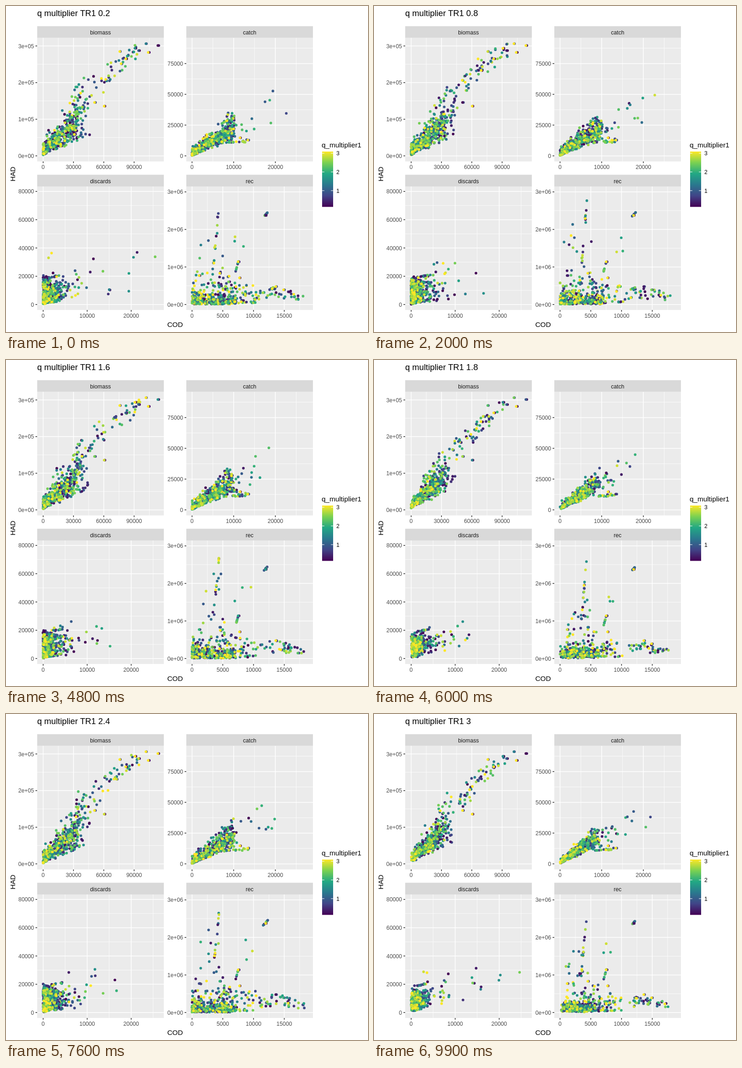
These frames come from a looping animation (789 by 710 pixels, 10000 ms). An HTML page with a canvas:

```html
<!DOCTYPE html>
<html lang="en">
<head>
<meta charset="utf-8">
<title>q multiplier</title>
<style>
  html, body { margin: 0; width: 100%; height: 100%; overflow: hidden; background: #fff; }
  svg, canvas { position: absolute; left: 0; top: 0; width: 789px; height: 710px; }
  text { font-family: "Liberation Sans", Arial, sans-serif; font-size: 12.2px; }
</style>
</head>
<body>
<svg id="chart" viewBox="0 0 789 710"></svg>
<canvas id="dots" width="789" height="710"></canvas>
<script>
const LOOP = 10000, STEP = 100, STATES = 15;
const VIRIDIS = ['#440154', '#414487', '#2a788e', '#22a884', '#7ad151', '#fde725'];

// x0,y0: pixel of the data origin; dx,dy: pixels between major lines
const PANELS = [
  { name: 'biomass', left: 68, top: 69.5, x0: 81, y0: 326.4, dx: 66.1, dy: 79.8,
    xs: ['0', '30000', '60000', '90000'], ys: ['0e+00', '1e+05', '2e+05', '3e+05'],
    shape: biomass, count: 540 },
  { name: 'catch', left: 393, top: 69.5, x0: 405.5, y0: 326.4, dx: 90.8, dy: 67,
    xs: ['0', '10000', '20000'], ys: ['0', '25000', '50000', '75000'],
    shape: landed, count: 560 },
  { name: 'discards', left: 68, top: 393, x0: 81, y0: 650.2, dx: 95.9, dy: 61.6,
    xs: ['0', '10000', '20000'], ys: ['0', '20000', '40000', '60000', '80000'],
    shape: discards, count: 480 },
  { name: 'rec', left: 393, top: 393, x0: 405.5, y0: 650.2, dx: 67, dy: 81.8,
    xs: ['0', '5000', '10000', '15000'], ys: ['0e+00', '1e+06', '2e+06', '3e+06'],
    shape: recruits, count: 480 }
];
const PW = 276, PH = 269, STRIP = 25.5;

// ---- static chart ----
const svg = document.getElementById('chart');
function add(tag, attrs, text) {
  const el = document.createElementNS('http://www.w3.org/2000/svg', tag);
  for (const k in attrs) el.setAttribute(k, attrs[k]);
  if (text !== undefined) el.textContent = text;
  svg.appendChild(el);
  return el;
}
const rect = (x, y, width, height, fill) => add('rect', { x, y, width, height, fill });
const line = (x1, y1, x2, y2, stroke, w) => add('line', { x1, y1, x2, y2, stroke, 'stroke-width': w });
function label(x, y, str, anchor, fill, size) {
  const el = add('text', { x, y, 'text-anchor': anchor, fill }, str);
  if (size) el.style.fontSize = size + 'px';
  return el;
}

function drawPanel(p) {
  const right = p.left + PW, bottom = p.top + PH;
  rect(p.left, p.top - STRIP, PW, STRIP, '#d9d9d9');
  label(p.left + PW / 2, p.top - 7.5, p.name, 'middle', '#1a1a1a');
  rect(p.left, p.top, PW, PH, '#ebebeb');
  for (const half of [0.5, 0]) {
    const w = half ? 0.75 : 1.5;
    for (let x = p.x0 + half * p.dx; x < right; x += p.dx) line(x, p.top, x, bottom, '#fff', w);
    for (let y = p.y0 - half * p.dy; y > p.top; y -= p.dy) line(p.left, y, right, y, '#fff', w);
  }
  p.xs.forEach((s, i) => {
    const x = p.x0 + i * p.dx;
    line(x, bottom, x, bottom + 3.8, '#333', 1.5);
    label(x, bottom + 16.5, s, 'middle', '#4d4d4d');
  });
  p.ys.forEach((s, i) => {
    const y = p.y0 - i * p.dy;
    line(p.left - 3.8, y, p.left, y, '#333', 1.5);
    label(p.left - 7, y + 4.5, s, 'end', '#4d4d4d');
  });
}

function drawLegend() {
  label(688, 308, 'q_multiplier1', 'start', '#000', 15.28);
  const grad = add('linearGradient', { id: 'scale', x1: 0, y1: 1, x2: 0, y2: 0 });
  VIRIDIS.forEach((c, i) => {
    grad.appendChild(add('stop', { offset: i / (VIRIDIS.length - 1), 'stop-color': c }));
  });
  rect(689, 317, 24, 120.5, 'url(#scale)');
  for (let v = 1; v <= 3; v++) {
    const y = 442.8 - 40.7 * v;
    line(689, y, 693.8, y, '#fff', 1);
    line(708.2, y, 713, y, '#fff', 1);
    label(720, y + 4.5, v, 'start', '#000');
  }
}

rect(0, 0, 789, 710, '#fff');
PANELS.forEach(drawPanel);
drawLegend();
label(368.5, 699, 'COD', 'middle', '#000', 15.28);
label(0, 0, 'HAD', 'middle', '#000', 15.28).setAttribute('transform', 'translate(19.5 366) rotate(-90)');
const title = label(68, 22, '', 'start', '#000', 18.33);

// ---- random numbers and colour ----
function random(seed) {
  let a = seed | 0;
  return () => {
    a = (a + 0x6d2b79f5) | 0;
    let t = Math.imul(a ^ (a >>> 15), 1 | a);
    t = (t + Math.imul(t ^ (t >>> 7), 61 | t)) ^ t;
    return ((t ^ (t >>> 14)) >>> 0) / 4294967296;
  };
}
const mix = (a, b, p) => a + (b - a) * p;
function colour(q) {
  const f = q * (VIRIDIS.length - 1), i = Math.min(Math.floor(f), VIRIDIS.length - 2);
  const part = (s, k) => parseInt(s.slice(k, k + 2), 16);
  return 'rgb(' + [1, 3, 5].map(k => Math.round(mix(part(VIRIDIS[i], k), part(VIRIDIS[i + 1], k), f - i))) + ')';
}
const INK = Array.from({ length: STATES }, (_, i) => colour(i / (STATES - 1)));

// ---- clouds: pixel offsets from the origin ----
// g picks the group, q is the multiplier, u v w are random, reach scales the tails
function biomass(g, q, u, v, w) {
  if (g < 0.58) {
    const x = 75 * u ** (1.1 + 1.3 * q);
    return [x, 2 + x * (0.5 + 0.7 * v) + 26 * w * w];
  }
  if (g < 0.76) {
    const x = 25 + (80 - 30 * q) * u;
    return [x, x * (0.45 + 0.9 * v)];
  }
  if (g < 0.89) {
    const x = 4 + 85 * u;
    return [x, x * (0.9 + 0.75 * v) + 50 * w * v];
  }
  const x = 72 + 140 * u ** 1.1;
  return [x, 1.62 * x - 0.0025 * x * x + (v + w - 1) * 48 * (1 - 0.6 * u)];
}

function landed(g, q, u, v, w, reach) {
  if (g < 0.92) {
    const x = 92 * u ** (1 + 0.7 * q);
    return [x, 1 + x * (0.36 + 0.3 * (v + w)) + 20 * w * w * v];
  }
  if (g < 0.95) return [74 + 50 * u, 29 + 9 * u * v];
  const x = 62 + 190 * reach * u ** 2;
  return [x, Math.min(x * (0.38 + 0.5 * v), 170)];
}

function discards(g, q, u, v, w, reach) {
  if (g < 0.9) {
    const x = -Math.log(u + 0.02) * (21 - 12 * q);
    return [x, mix(2 * w + (66 - 14 * q) * v ** 1.3, 10 + 34 * v, x / (x + 25))];
  }
  if (g < 0.93) return [6 + 36 * u, 52 + 11 * Math.sqrt(u) + 3 * v];
  if (g < 0.965) return [20 + 75 * u, 15 + 55 * v];
  return [5 + 240 * reach * u ** 1.6, 22 + 165 * reach * v * mix(w, u, 0.5)];
}

function recruits(g, q, u, v, w) {
  if (g < 0.68) return [95 * u ** (1.2 + 0.5 * q), 1 + Math.min(-Math.log(v + 0.01) * 12, 46)];
  if (g < 0.725) return [6 + 65 * u, 40 + 145 * v ** 1.6];
  if (g < 0.75) return [46 + 12 * u + 2 * v, 90 + 138 * u];
  if (g < 0.757) return [92 + 45 * u, 110 + 55 * v];
  if (g < 0.8) return [30 + 110 * u, 3 + 4 * v];
  if (g < 0.88) return [60 + 80 * u, 5 + 42 * v];
  if (g < 0.96) {
    const x = 140 + 105 * u;
    return [x, 6 + (0.2 + 0.8 * v) * 33 * Math.max(0.45, 1 - ((x - 180) / 75) ** 2)];
  }
  if (g < 0.97) return [60 + 32 * u, 48 + 14 * v];
  if (g < 0.985) return [155 + 10 * u, 190 + 11 * u];
  return [95 + 6 * u, 72 + 22 * u];
}

const reachOf = s => 1 - 0.4 * Math.sin(Math.PI * s / STATES);

function cloud(p, n) {
  const rows = [];
  for (let i = 0; i < p.count; i++) {
    const r = random(n * 7919 + i * 131 + 17), c = Math.floor(r() * STATES);
    const g = (i + 0.5) / p.count, path = [];
    for (let s = 0; s < STATES; s++) {
      const [x, y] = p.shape(g, c / (STATES - 1), r(), r(), r(), reachOf(s));
      path.push([p.x0 + x, p.y0 - y]);
    }
    rows.push({ ink: INK[c], path, order: c + r() * 18 });
  }
  return rows.sort((a, b) => a.order - b.order);
}

// key points that every state shares
const FIXED = [
  [305, 82], [331, 86], [281, 92], [289, 97], [310, 101], [248, 99], [261, 115], [214, 218], [193, 210],
  [527, 292], [510, 287], [566, 456], [506, 557], [466, 582], [509, 592], [421, 587], [588, 611], [605, 618]
];

function fixedDots() {
  const r = random(42);
  return FIXED.map(([x, y]) => ({
    x, y,
    tops: Array.from({ length: STATES }, () => INK[r() < 0.55 ? 14 : Math.floor(r() * STATES)]),
    twin: INK[Math.floor(r() * 4)],
    shift: 1 + r() * 1.5
  }));
}

const rows = PANELS.flatMap(cloud);
const fixed = fixedDots();

// ---- playback ----
const ctx = document.getElementById('dots').getContext('2d');
function dot(x, y, ink) {
  ctx.fillStyle = ink;
  ctx.beginPath();
  ctx.arc(x, y, 2.85, 0, 7);
  ctx.fill();
}

const moveStart = s => s <= 10 ? 400 + 700 * s : 7400 + 600 * (s - 10);

function draw(t) {
  let s = 0;
  while (s < STATES - 1 && moveStart(s) + 2 * STEP <= t) s++;
  const k = t - moveStart(s), p = k < 0 ? 0 : (k / STEP + 1) / 3;
  const next = (s + 1) % STATES;
  title.textContent = 'q multiplier TR1 ' + +(0.2 * (s + 1)).toFixed(1);
  ctx.clearRect(0, 0, 789, 710);
  for (const { path, ink } of rows) {
    const a = path[s], b = path[next];
    dot(mix(a[0], b[0], p), mix(a[1], b[1], p), ink);
  }
  for (const f of fixed) {
    dot(f.x + f.shift, f.y, f.twin);
    dot(f.x, f.y, f.tops[p > 0.5 ? next : s]);
  }
}

let shown = -1;
const begin = performance.now();
function tick() {
  const t = Math.floor(((performance.now() - begin) % LOOP) / STEP) * STEP;
  if (t !== shown) draw(shown = t);
  requestAnimationFrame(tick);
}
tick();
</script>
</body>
</html>
```
